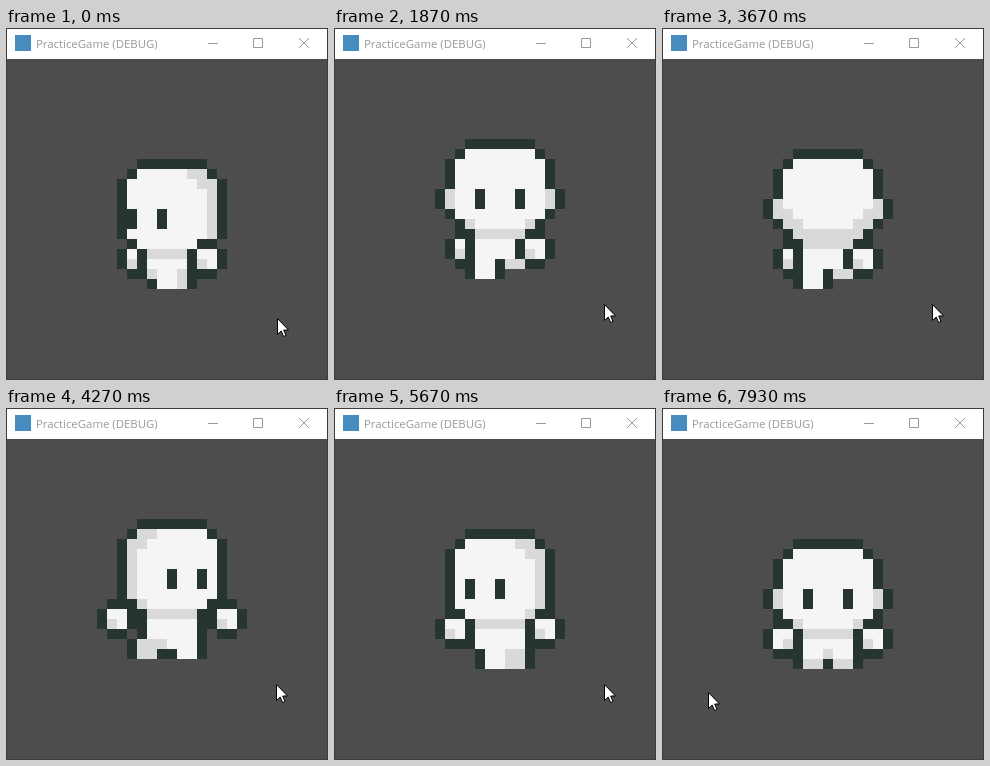
Animation of 322 by 352 pixels, one loop 8 s. Source, as an HTML page:

```html
<!DOCTYPE html>
<html lang="en">
<head>
<meta charset="utf-8">
<title>Walk cycle</title>
<style>
  html, body { margin: 0; width: 100%; height: 100%; overflow: hidden; background: #4d4d4d; }
  svg { display: block; width: 322px; height: 352px; }
  text { font: 11.4px "Open Sans", "Noto Sans", sans-serif; fill: #999; }
</style>
</head>
<body>
<svg viewBox="0 0 322 352">
  <rect width="322" height="352" fill="#3c3c3c"/>
  <rect x="1" y="1" width="320" height="350" fill="#4d4d4d"/>
  <rect x="1" y="1" width="320" height="30" fill="#fff"/>
  <rect x="9" y="7" width="16" height="16" fill="#478cbf"/>
  <text x="30" y="20">PracticeGame (DEBUG)</text>
  <path d="M202 15.5h10M247.5 10.5h9v9h-9zM293 10l10 10M303 10l-10 10" fill="none" stroke="#999"/>
  <g id="hero" shape-rendering="crispEdges"></g>
  <path id="cursor" d="M.5 .5V16.5L4.2 13L6.6 18.5L9 17.5L6.7 12H11.5Z" fill="#fff" stroke="#000"/>
</svg>
<script>
const LOOP = 8000, TICK = 1000 / 15, CELL = 10;
const hero = document.getElementById('hero');
const cursor = document.getElementById('cursor');

let out, flip, top0;

// Fill a block of cells; y counts from the top of the head.
const fill = color => (x, y, w, h) => {
  const col = flip ? 33 - x - w : x;
  out += `<rect x="${col * CELL + 1}" y="${(y + top0) * CELL + 1}" width="${w * CELL}" height="${h * CELL}" fill="${color}"/>`;
};
const dark = fill('#263532'), white = fill('#f5f5f5'), shade = fill('#d9d9d9');

function skull() {
  dark(13, 0, 7, 1);
  dark(12, 1, 9, 8);
  dark(11, 2, 11, 6);
  white(13, 1, 7, 8);
  white(12, 2, 9, 6);
}

function ears() {
  dark(10, 5, 13, 2);
  shade(11, 5, 11, 2);
}

function eyes(a, b) {
  dark(a, 5, 1, 2);
  dark(b, 5, 1, 2);
}

function frontHead() {
  skull();
  ears();
  white(12, 5, 9, 2);
  eyes(14, 18);
  shade(13, 8, 1, 1);
  shade(19, 8, 1, 1);
}

function backHead() {
  skull();
  ears();
  white(12, 5, 9, 1);
  white(13, 6, 7, 1);
  shade(12, 7, 9, 1);
  white(14, 7, 5, 1);
  shade(13, 8, 7, 1);
}

function sideHead(turned) {
  skull();
  shade(18, 1, 2, 1);
  shade(19, 2, 2, 1);
  shade(20, 3, 1, 5);
  shade(19, 8, 1, 1);
  if (turned) return eyes(13, 16);
  eyes(11, 15);
  eyes(12, 15);
}

function torso(w, h) {
  dark(13, 9, w + 2, h + 1);
  shade(14, 9, w, 1);
  white(14, 10, w, h);
}

function arm(x, y, w, shadeAt) {
  dark(x + 1, y, w, 4);
  dark(x, y + 1, w + 2, 2);
  white(x + 1, y + 1, w, 2);
  shade(x + 1 + shadeAt, y + 2, 1, 1);
}

function leg(x, y, h, paint) {
  dark(x - 1, y, 4, h);
  paint(x, y, 2, h);
}

function facing(step, head) {
  const p = step % 4;
  torso(5, p === 1 ? 3 : 2);
  if (p === 0) {
    shade(16, 11, 1, 1);
    leg(14, 12, 1, shade);
    leg(17, 12, 1, shade);
  } else if (p === 1) {
    shade(16, 12, 1, 1);
    leg(14, 13, 1, shade);
    leg(17, 13, 1, white);
  } else {
    leg(14, 12, 1, shade);
    leg(17, 12, 2, white);
  }
  head();
  if (p === 0) {
    arm(10, 8, 2, 1);
    arm(19, 8, 2, 0);
  } else {
    arm(11, 9, 2, 1);
    arm(19, 9, 1, 0);
  }
}

function sideStand() {
  torso(4, 2);
  shade(14, 11, 1, 1);
  shade(17, 11, 1, 1);
  dark(14, 12, 5, 1);
  white(15, 12, 2, 1);
  shade(17, 12, 1, 1);
  sideHead(false);
  arm(11, 8, 1, 0);
  arm(18, 8, 2, 0);
}

// Near half of the stride: the chest turns to the viewer.
function sideOpen(p) {
  torso(5, 2);
  if (p === 1) {
    dark(14, 12, 6, 2);
    white(15, 12, 2, 2);
    shade(17, 12, 2, 2);
  } else if (p === 2) {
    dark(13, 12, 8, 2);
    white(14, 12, 3, 1);
    shade(17, 12, 3, 1);
    white(14, 13, 2, 1);
    shade(18, 13, 2, 1);
  } else {
    dark(13, 12, 7, 1);
    white(14, 12, 3, 1);
    shade(17, 12, 2, 1);
    leg(14, 13, 1, white);
  }
  sideHead(true);
  const spread = p === 2 ? 1 : 0;
  arm(10 - spread, 8, 2, spread ? 1 : 0);
  arm(19 + spread, 8, 2, spread ? 1 : 0);
}

// Far half of the stride: only the near arm shows.
function sideClosed(p) {
  torso(4, 2);
  if (p === 1) {
    dark(14, 12, 5, 2);
    shade(15, 12, 1, 2);
    white(16, 12, 2, 2);
  } else {
    dark(13, 12, 7, 1);
    shade(14, 12, 2, 1);
    white(16, 12, 2, 1);
    leg(14, 13, 1, shade);
    if (p === 2) dark(17, 13, 2, 1);
  }
  sideHead(false);
  arm(17, 9, 2, 0);
}

function side(step) {
  const p = step % 4;
  if (p === 0) sideStand();
  else if (step < 4) sideOpen(p);
  else sideClosed(p);
}

// Down, up, right, left: eight poses each.
function drawHero(n) {
  const i = (n + 29) % 32, dir = i >> 3, step = i % 8;
  out = '';
  top0 = [13, 12, 11, 12][step % 4];
  flip = dir < 2 ? step > 4 : dir === 2;
  if (dir < 2) facing(step, dir ? backHead : frontHead);
  else side(step);
  hero.innerHTML = out;
}

function cursorAt(tick) {
  if (tick < 11) return [271, 290];
  if (tick < 15) return [[271, 286], [270, 280], [270, 277]][Math.min(tick - 11, 2)];
  const u = Math.max(0, (tick - 109) / 10), e = u * u * (3 - 2 * u);
  return [Math.round(270 - 224 * e), Math.round(276 + 8 * e)];
}

let last = -1;
function render(t) {
  const tick = Math.floor((t % LOOP + 4) / TICK) % 120;
  if (tick === last) return;
  last = tick;
  drawHero(Math.floor((tick - 1) / 3));
  cursor.setAttribute('transform', `translate(${cursorAt(tick)})`);
}

const start = performance.now();
function loop() {
  render(performance.now() - start);
  requestAnimationFrame(loop);
}
loop();
</script>
</body>
</html>
```
